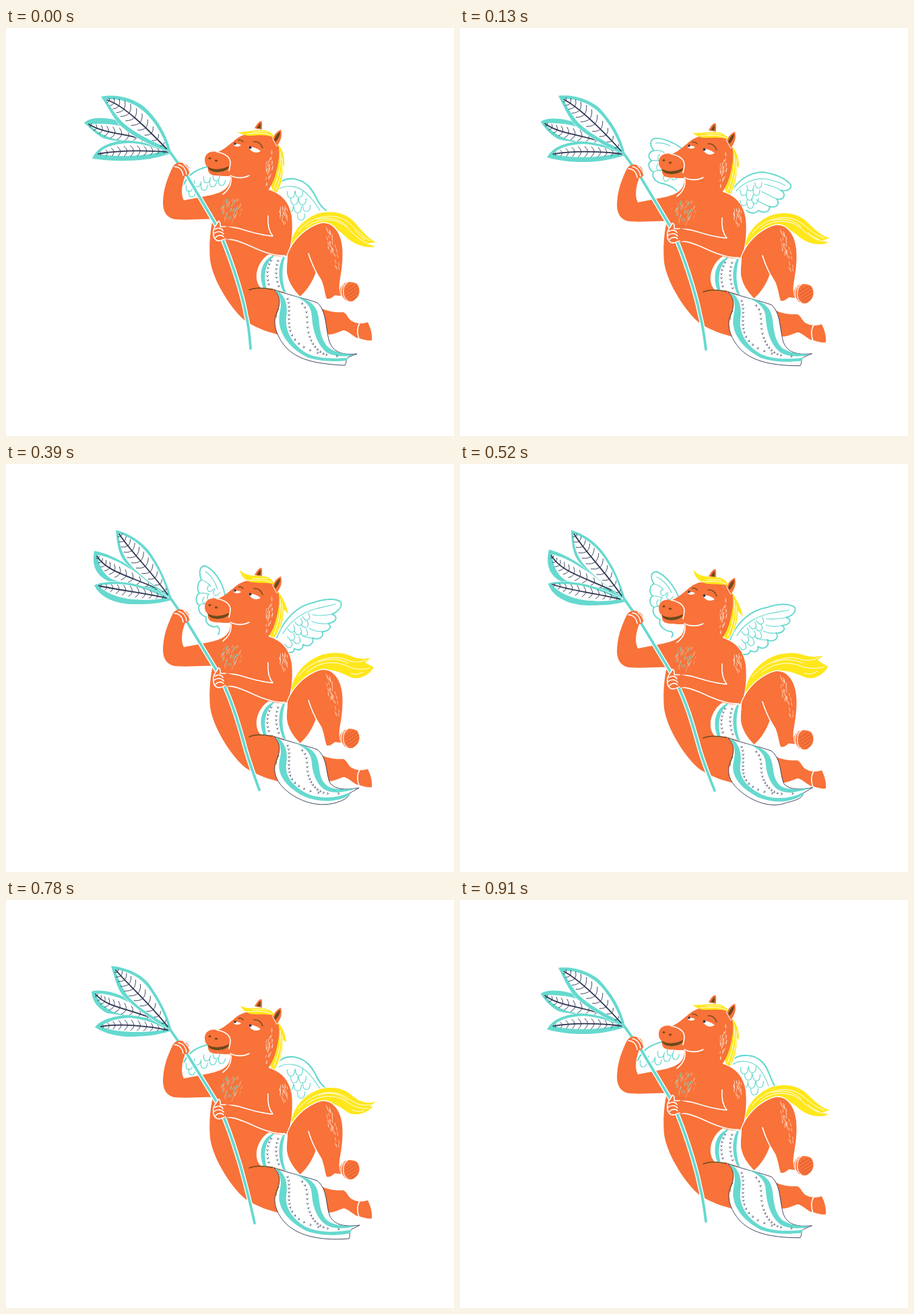
Animation of 665 by 606 pixels, one loop 1040 ms. Source, as an HTML page:

```html
<!DOCTYPE html>
<html lang="en">
<head>
<meta charset="utf-8">
<title>Winged horse</title>
<style>
html, body { margin: 0; width: 100%; height: 100%; overflow: hidden; background: #fff; }
svg { display: block; width: 665px; height: 606px; stroke-linecap: round; stroke-linejoin: round; }
</style>
</head>
<body>
<svg id="stage" viewBox="0 0 665 606"></svg>
<script>
const ORANGE = '#f87239', TEAL = '#66d9cf', YELLOW = '#ffe71c', NAVY = '#2f3552', BROWN = '#6b4a1c', WHITE = '#fff';
const STEP = 130;
const DROP = [0, 3, 9, 16, 18, 16, 9, 3];
const WING = ['low', 'half', 'up', 'top', 'up', 'half', 'low', 'tuck'];

const fill = (d, c, edge = 0) =>
  `<path d="${d}" fill="${c}"${edge ? ` stroke="${WHITE}" stroke-width="${edge}" paint-order="stroke"` : ''}/>`;
const line = (d, c = WHITE, w = 1.6) => `<path d="${d}" fill="none" stroke="${c}" stroke-width="${w}"/>`;
const shift = (y, s) => `<g transform="translate(0 ${y})">${s}</g>`;
const nums = s => s.match(/-?[\d.]+/g).map(Number);

// Blend three poses of one path, set at drops of 0, 9 and 16 px.
function pose(keys, drop) {
  const i = drop < 9 ? 0 : 1, f = i ? (drop - 9) / 7 : drop / 9;
  const to = nums(keys[i + 1]);
  let n = 0;
  return keys[i].replace(/-?[\d.]+/g, v => (+v + (to[n++] - v) * f).toFixed(1));
}

// Visit n points on a chain of cubics.
function along(path, n, visit) {
  const p = nums(path), segs = (p.length - 2) / 6;
  let out = '';
  for (let k = 0; k < n; k++) {
    const u = (k + .5) / n, s = Math.min(segs - 1, Math.floor(u * segs));
    const t = u * segs - s, m = 1 - t, q = p.slice(s * 6, s * 6 + 8);
    const at = j => m * m * m * q[j] + 3 * m * m * t * q[j + 2] + 3 * m * t * t * q[j + 4] + t * t * t * q[j + 6];
    const vel = j => m * m * (q[j + 2] - q[j]) + 2 * m * t * (q[j + 4] - q[j + 2]) + t * t * (q[j + 6] - q[j + 4]);
    out += visit(at(0), at(1), Math.atan2(vel(1), vel(0)), u);
  }
  return out;
}

const ray = (x, y, a, r) => `${(x + Math.cos(a) * r).toFixed(1)} ${(y + Math.sin(a) * r).toFixed(1)}`;

const chevrons = (path, n) => line(along(path, n, (x, y, a) =>
  `M${ray(x, y, a + 2.3, 1.7)}L${ray(x, y, a, 1)}L${ray(x, y, a - 2.3, 1.7)}`), NAVY, .8);

// Short hairs scattered in an ellipse.
function fuzz(cx, cy, rx, ry, n, lean, c, seed, tilt = 0) {
  let d = '';
  const rnd = () => (seed = seed * 16807 % 2147483647) / 2147483647;
  for (let i = 0; i < n; i++) {
    const r = Math.sqrt(rnd()), a = rnd() * 6.283, len = 3 + rnd() * 2.5;
    const y = cy + r * Math.sin(a) * ry, x = cx + r * Math.cos(a) * rx + (y - cy) * tilt;
    d += `M${x.toFixed(1)} ${y.toFixed(1)}l${(lean * len).toFixed(1)} ${len.toFixed(1)}`;
  }
  return line(d, c, .8);
}

function scales(list, r, turn = 0) {
  const p = nums(list);
  let s = '';
  for (let i = 0; i < p.length; i += 2)
    s += `<path transform="translate(${p[i]} ${p[i + 1]}) rotate(${turn})" d="M${-r} ${-r * .7}Q${-r} ${r} 0 ${r}Q${r} ${r} ${r} ${-r * .7}" fill="none" stroke="${TEAL}" stroke-width="1.2"/>`;
  return s;
}

const teal = (d, w = 1.9) => line(d, TEAL, w);
const wings = {
  low: { base: 0, art:
    teal('M398 241C404 228 415 223 427 224C447 227 455 241 461 253C465 262 470 267 475 271', 2.2) +
    teal('M405 239C418 232 433 235 443 243C453 251 459 260 466 271', 1.1) +
    scales('423 247 435 246 428 257 440 257 421 268 433 269 446 267 438 280', 5.5) +
    teal('M264 232C271 216 284 210 299 206', 2.2) +
    scales('272 238 284 231 298 225 312 222 294 236 307 231 320 229 276 246', 5, 10) },
  tuck: { base: 3, art:
    teal('M398 244C405 234 415 230 427 231C446 232 454 246 459 258C462 267 465 272 468 278', 2.2) +
    teal('M405 244C416 237 430 239 440 246C449 254 453 264 458 276', 1.1) +
    scales('422 253 434 251 428 262 440 263 422 273 433 274 445 273 437 284', 5.5) +
    teal('M264 238C270 223 283 215 299 211', 2.2) +
    scales('272 243 284 236 298 229 312 226 294 240 307 235 320 232', 5, 10) },
  up: { base: 9, art:
    teal('M401 252C410 228 430 208 456 204C472 198 490 198 497 204C500 211 492 217 484 219C494 221 490 230 478 231C486 236 478 243 469 242C475 249 466 257 456 252C461 262 450 268 442 262C444 269 438 272 431 268C430 274 424 275 418 273') +
    teal('M411 246C422 227 442 217 460 213C472 211 482 209 488 208M455 221C466 222 475 221 484 219M454 230C462 233 470 233 478 231M450 239C457 242 463 243 469 242M440 249C446 252 450 253 456 252', 1.2) +
    scales('446 224 435 231 444 234 424 240 434 244 443 246 424 252 432 256 420 262', 5, -30) +
    teal('M325 190C318 172 305 156 292 151C283 151 282 160 288 169C281 172 280 182 286 187C280 191 281 200 288 204C284 210 289 219 297 222C294 230 302 239 314 240C317 243 316 246 314 248') +
    teal('M314 182C309 171 300 162 292 159M288 169C294 171 299 173 302 178M286 187C292 187 297 188 301 190M288 204C291 202 294 202 297 203', 1.2) +
    scales('302 182 311 188 302 194 296 198', 4.5, 35) },
  top: { base: 16, art:
    teal('M402 258C412 232 432 210 456 206C472 200 490 199 497 205C500 212 492 220 484 223C494 227 490 235 478 237C486 242 478 249 469 249C473 256 464 263 455 258C458 267 449 273 441 268C441 276 434 278 428 274C428 280 422 281 418 279') +
    teal('M411 252C422 232 442 220 460 215C472 212 482 210 489 208M455 224C466 226 475 225 484 223M454 234C462 237 470 238 478 237M450 244C457 248 463 249 469 249M440 255C446 258 450 259 455 258', 1.2) +
    scales('446 227 435 235 444 238 424 245 434 249 443 251 424 257 432 262 420 268', 5, -30) +
    teal('M325 194C321 174 308 156 295 151C287 152 286 162 290 172C284 176 283 186 287 192C281 196 281 206 287 210C284 217 289 225 297 227C295 236 303 244 314 241C318 245 317 250 315 253') +
    teal('M314 186C310 173 302 163 296 160M290 172C296 174 301 177 304 182M287 192C293 191 297 192 301 194M287 210C291 207 294 207 297 208', 1.2) +
    scales('303 185 312 191 303 198 296 203', 4.5, 35) },
  half: { base: 16, art:
    teal('M401 260C410 240 430 227 450 227C468 230 483 236 491 246C492 253 485 256 476 254C485 260 481 269 470 267C476 275 469 281 459 278C461 286 451 289 443 284C438 290 430 288 425 284') +
    teal('M410 255C421 242 438 236 452 237C466 239 476 243 483 247M452 245C462 247 470 250 476 254M448 256C456 260 463 264 470 267M440 268C447 273 453 276 459 278', 1.2) +
    scales('443 246 431 250 440 257 421 257 430 264 438 269 421 272 431 276', 5, 0) +
    teal('M328 191C315 182 300 176 288 177C281 181 282 188 288 195C279 197 278 206 285 210C277 213 280 223 287 227C284 235 291 243 301 244C311 247 319 251 322 255') +
    teal('M312 188C303 184 296 183 290 184M288 195C294 194 299 195 303 198M285 210C291 209 295 210 299 212M287 227C292 224 297 224 302 226', 1.2) +
    scales('298 206 296 220 306 224 318 234 306 236', 4.5, 35) }
};

const tail = [
  'M423 320C426 300 442 284 462 276C482 270 502 274 515 286C526 298 536 312 549 318L536 320L548 325C528 328 512 318 502 308C492 298 480 291 466 291C448 295 432 310 425 322Z',
  'M423 329C428 306 444 288 466 281C484 276 502 280 513 290C525 300 538 304 549 299L540 307L545 306C535 318 520 321 508 316C495 306 484 300 470 300C450 304 432 319 425 331Z',
  'M423 335C428 310 446 291 470 283C490 278 502 281 514 286C524 290 532 290 541 288L533 295L546 302C538 315 522 322 510 316C497 310 484 304 470 306C450 311 432 326 425 337Z'];
const strands = [
  'M434 302C450 281 484 272 506 287C518 296 526 308 540 316M445 296C464 281 490 281 508 298C518 309 528 316 538 321M462 284C482 280 494 284 506 294M518 300C523 307 528 311 533 314',
  'M434 310C452 288 482 278 505 293C517 302 528 307 542 304M447 303C466 287 492 289 508 301C518 308 528 311 538 309M464 290C484 284 494 288 506 297M514 312C520 314 526 315 531 313',
  'M434 315C452 293 484 281 506 291C516 295 526 295 535 291M447 309C468 291 492 293 508 301C518 305 530 306 540 303M464 294C484 287 496 290 508 296M512 311C518 313 524 313 530 309'];
const bangs = [
  'M343 155C358 154 372 150 386 152C393 155 397 158 398 163C388 157 372 160 358 160C352 158 348 157 343 155Z',
  'M348 148C358 154 372 150 385 152C393 155 397 158 398 163C388 159 375 162 362 160C355 157 350 153 348 148Z',
  'M347 141C355 152 372 149 385 151C393 153 397 158 398 163C388 159 375 162 362 159C353 155 348 149 347 141Z'];
const mane = [
  'M403 172C411 180 414 192 413 206L411 203C411 222 408 236 401 245C396 242 393 238 394 232C400 212 404 195 403 172Z',
  'M403 172C411 180 415 191 416 202L411 199C411 219 406 234 398 243C393 241 391 236 392 230C399 212 404 195 403 172Z',
  'M403 172C411 182 417 195 419 207L412 200C412 220 406 234 397 243C392 241 390 236 391 230C399 212 404 195 403 172Z'];

// Each leaf: outline, pale inside, midrib; vein length last.
const leaves = [
  { edge: [
      'M116 141C125 132 145 133 160 136C185 143 215 160 240 183C200 168 160 170 143 163C130 155 125 148 116 141Z',
      'M127 136C140 132 160 137 173 143C195 153 220 172 243 193C210 172 170 172 150 168C135 160 128 150 127 136Z',
      'M131 129C148 132 165 140 180 150C200 162 225 180 243 200C210 182 175 176 152 174C133 165 127 150 131 129Z'],
    pale: [
      'M123 143C145 141 170 143 190 152C205 160 218 167 228 173C200 169 170 168 155 163C140 158 130 150 123 143Z',
      'M133 139C150 138 170 145 185 153C205 163 220 172 228 178C200 173 170 172 157 165C143 158 136 148 133 139Z',
      'M136 135C152 138 168 145 183 155C200 165 215 177 225 184C200 180 170 177 157 171C143 163 137 148 136 135Z'],
    rib: ['M123 143C150 160 190 155 233 177', 'M133 140C150 160 180 160 231 181', 'M135 137C150 160 180 165 231 188'], vein: 10 },
  { edge: [
      'M128 194C135 178 150 170 175 167C200 167 225 175 245 186C225 193 205 197 180 197C160 198 145 196 128 194Z',
      'M132 189C140 178 160 172 180 171C205 172 225 180 246 194C225 201 205 203 180 203C160 202 145 197 132 189Z',
      'M131 180C145 174 165 174 185 177C205 181 228 190 246 202C225 208 205 209 180 208C155 205 138 195 131 180Z'],
    pale: [
      'M137 187C145 176 165 171 185 171C205 172 222 178 233 182C215 190 165 193 137 187Z',
      'M141 188C150 179 170 175 185 175C205 177 225 184 238 192C210 198 165 198 141 188Z',
      'M137 181C150 178 170 177 188 181C207 185 225 193 237 199C205 205 160 203 137 181Z'],
    rib: ['M137 187C170 181 210 182 240 184', 'M141 188C170 183 210 187 240 193', 'M138 181C165 187 210 192 238 199'], vein: 9 },
  { edge: [
      'M141 102C165 97 190 105 205 117C222 132 238 155 245 185C215 175 185 160 168 143C157 130 150 115 141 102Z',
      'M156 98C180 100 200 110 212 124C230 150 240 170 246 194C220 180 190 160 172 140C165 130 162 118 156 98Z',
      'M163 98C185 104 203 116 215 133C232 158 240 180 246 201C225 185 195 165 178 147C167 135 165 120 163 98Z'],
    pale: [
      'M148 106C175 104 195 114 208 127C223 142 233 160 239 178C215 168 190 155 174 141C161 128 154 115 148 106Z',
      'M162 103C185 106 201 117 211 130C226 150 236 172 240 186C215 172 190 155 179 140C169 125 165 112 162 103Z',
      'M167 103C187 109 203 122 214 138C229 160 236 178 240 193C215 178 192 160 181 145C170 130 168 115 167 103Z'],
    rib: ['M150 107C175 115 205 145 238 179', 'M163 104C180 125 208 148 240 188', 'M168 104C185 130 212 155 240 194'], vein: 14 }
];

const shaft = [
  'M244 185L269 220L312 293C328 325 350 390 356 425C361 445 362 462 363 476',
  'M244 193L269 229L314 302C330 335 346 385 356 425C361 445 366 465 369 480',
  'M244 199L269 235L314 309C332 342 344 380 356 425C362 445 369 465 376 484'];

const cloth = [
  'M398 389C412 402 404 418 400 428C396 445 405 462 416 475C432 491 455 499 503 501C506 497 504 492 508 489L521 484C500 486 486 482 480 466C474 445 476 420 462 408C445 402 425 398 398 389Z',
  'M398 398C412 411 404 427 400 437C396 452 404 468 414 479C430 496 460 507 509 503C512 498 508 494 513 489L525 483C500 486 488 482 481 470C474 452 478 430 462 417C445 411 425 407 398 398Z',
  'M398 405C412 418 404 434 400 444C396 458 402 471 411 480C428 498 460 512 490 503C500 500 510 495 510 489L524 481C502 485 488 483 481 474C474 458 478 437 462 424C445 418 425 414 398 405Z'];
const bandL = [
  'M399 389C411 402 408 415 406 425C402 450 418 474 447 489C465 495 485 496 506 494L507 490C480 492 460 490 446 483C425 470 414 450 416 430C419 410 414 398 404 391Z',
  'M399 398C411 411 408 424 406 434C402 455 416 476 445 491C465 499 490 499 511 495L512 490C485 495 462 493 446 486C425 474 414 457 416 439C419 419 414 407 404 400Z',
  'M399 405C411 418 408 431 406 441C402 460 414 479 443 494C465 503 490 503 510 492L510 488C488 498 462 497 446 489C425 478 414 463 416 446C419 426 414 414 404 407Z'];
const bandR = [
  'M424 397C446 404 454 415 454 430C456 455 464 472 476 482C487 488 500 488 512 487L519 485C498 485 486 480 478 474C467 462 466 448 464 430C462 415 455 404 428 398Z',
  'M424 406C446 413 454 424 454 439C456 460 464 476 476 483C487 489 500 488 513 486L521 484C498 485 486 482 478 477C467 467 466 455 464 439C462 424 455 413 428 407Z',
  'M424 413C446 420 454 431 454 446C456 464 464 480 476 485C487 490 500 487 510 485L520 482C498 484 486 483 478 479C467 471 466 460 464 446C462 431 455 420 428 414Z'];
const rowL = [
  'M417 400C424 415 417 435 422 450C428 470 450 485 500 488',
  'M417 409C424 424 417 442 422 457C428 475 450 489 503 489',
  'M417 416C424 431 417 449 422 463C428 479 450 493 503 489'];
const rowR = [
  'M437 407C452 418 444 440 450 456C454 470 462 480 474 485',
  'M437 416C452 427 444 447 450 461C454 474 462 483 474 487',
  'M437 423C452 434 444 453 450 466C454 477 462 486 474 489'];

const body =
  fill('M333 219C334 236 325 244 300 249L264 256C259 247 261 232 266 220L272 214C273 206 268 201 258 200C250 202 247 207 244 214C238 228 233 242 233 262C234 275 240 282 250 284C270 286 290 283 307 284C303 300 301 325 303 345C307 370 322 396 338 417C346 427 353 434 360 438C375 447 390 452 407 456L425 440L412 400L417 338C424 325 426 300 424 280C421 262 412 247 389 240L400 200Z', ORANGE, 2) +
  fill('M369 149C372 143 375 139 379 138C381 142 380 146 380 151Z', ORANGE) +
  fill('M372 149C374 145 376 142 378 141L378 149Z', BROWN) +
  fill('M295 195C296 186 303 182 314 184C322 182 330 174 337 169C342 164 350 158 362 157L385 157C395 159 401 165 404 174C407 185 405 198 402 210C399 225 394 234 389 241L340 240L333 220C322 220 309 220 303 217C300 214 299 210 300 207C296 204 295 200 295 195Z', ORANGE) +
  fill('M396 164C399 157 403 153 408 151C410 158 409 167 402 175Z', ORANGE, 1.6) +
  fill('M398 166C400 160 403 156 407 154C407 160 404 165 400 169Z', BROWN) +
  line('M313 184C323 186 332 190 333 199C333 204 332 208 331 212') +
  line('M333 219C342 224 354 223 361 219') +
  line('M334 222C335 233 330 241 322 247') +
  fill('M299 206C307 211 320 211 331 205C331 210 325 213 315 214C307 214 301 212 299 206Z', BROWN) +
  `<ellipse cx="302.500" cy="193.500" rx="1.900" ry="1.500" fill="${BROWN}"/><ellipse cx="312" cy="197" rx="2.200" ry="1.500" fill="${BROWN}"/>` +
  fill('M338 174C341 171 346 172 349 174C345 177 341 177 338 174Z', WHITE) +
  `<circle cx="340" cy="172" r="1.700" fill="${NAVY}"/>` +
  fill('M360 177C366 176 374 179 378 183C371 187 364 185 360 177Z', WHITE) +
  `<circle cx="362.500" cy="177.500" r="2" fill="${NAVY}"/>` +
  line('M345 167C347 165 350 167 352 169M368 169C374 168 379 172 381 178', BROWN, 1.4) +
  fuzz(391, 206, 5, 26, 30, -.2, '#ffd9c2', 11, -.08) +
  fuzz(335, 268, 19, 19, 30, -.35, '#ffb08a', 5) + fuzz(334, 267, 13, 16, 26, -.4, TEAL, 77) +
  fuzz(413, 275, 7, 17, 24, .15, '#ffe3d2', 23, .1) +
  line('M389 279C388 292 391 303 396 309C378 308 360 302 347 298C338 296 331 295 324 296') +
  line('M324 314C335 312 350 318 365 325C380 332 398 339 414 338');

const legs =
  fill('M418 337C426 315 446 296 468 290C486 288 497 305 499 325C501 345 497 365 495 378C494 388 495 394 498 398L488 397C484 400 482 403 476 402C473 395 473 385 468 374L460 362C456 375 447 390 436 399C425 388 415 372 417 355Z', ORANGE, 3) +
  line('M449 335C452 345 456 354 460 362L468 376') +
  fuzz(484, 326, 6, 32, 36, .25, '#ffd9c2', 41, .25) +
  fill('M496 387C500 377 511 375 521 380C527 388 526 400 514 406C504 407 494 400 496 387Z', ORANGE, 1) +
  line('M507 378C499 382 498 400 507 405M501 381C496 387 496 398 502 403', WHITE, 1.2) +
  line('M504 389L516 381M504 394L521 383M506 398L523 387M508 402L523 392M513 404L522 398', '#cf5a2c', .9) +
  fill('M464 414C475 421 490 423 500 422C507 424 507 433 515 436C520 439 528 440 537 437C541 445 544 455 543 464C535 465 527 461 520 460C512 455 506 449 501 449C494 451 485 456 478 455Z', ORANGE) +
  line('M525 438C521 445 521 454 524 462');

const wrap =
  fill('M386 339C373 350 366 372 378 386C390 390 396 386 404 390L438 400C426 388 414 372 417 350L418 338C408 341 396 338 390 336Z', WHITE) +
  fill('M396 338C380 345 374 365 382 386L387 388C382 368 384 350 398 339Z', TEAL) +
  fill('M411 340C403 355 404 375 411 391L416 394C409 378 409 358 414 340Z', TEAL) +
  chevrons('M395 343C387 355 386 370 391 384', 7) + chevrons('M405 343C399 357 400 372 406 387', 7) +
  line('M361 389C373 384 384 387 396 388', BROWN, 1.5);

const hands =
  fill('M246 212C247 203 254 199 260 200C268 202 273 208 272 216C270 220 266 221 262 219L250 222Z', ORANGE) +
  line('M250 206C257 206 262 211 263 219M256 203C263 204 267 210 268 217M264 202C269 206 272 210 273 215') +
  fill('M309 299C309 294 314 292 315 287C318 286 319 290 318 294C325 293 332 296 340 298L336 313C328 313 318 318 313 315C308 311 308 304 309 299Z', ORANGE) +
  line('M315 287C314 292 308 295 308 301C307 308 309 314 314 316C319 317 322 314 326 313M316 287C319 289 318 293 318 295L326 295M310 299C315 296 320 297 322 301M309 305C314 301 320 302 323 306M311 311C315 307 320 307 323 310');

function leaf(l, drop) {
  const rib = pose(l.rib, drop);
  const veins = along(rib, 11, (x, y, a, u) => {
    const r = l.vein * Math.sin(Math.PI * (.06 + u * .88));
    return [1, -1].map(s =>
      `M${x.toFixed(1)} ${y.toFixed(1)}Q${ray(x, y, a + s * 1.7, r * .5)} ${ray(x, y, a + s * 2.1, r)}`).join('');
  });
  return fill(pose(l.edge, drop), TEAL, 1.2) + fill(pose(l.pale, drop), WHITE) +
    line(veins, NAVY, .9) + line(rib, NAVY, 1.8);
}

function scene(k) {
  const drop = DROP[k], wing = wings[WING[k]], at = keys => pose(keys, drop);
  const back = at(mane), pole = at(shaft), drape = at(cloth);
  return shift(drop - wing.base, wing.art) +
    fill(at(tail), YELLOW, 2) + line(at(strands), WHITE, 1) +
    shift(drop, fill(back, YELLOW, 2) +
      line('M407 184C409 204 404 222 397 239M410 192C411 210 407 225 401 240', WHITE, 1) +
      body + fill(at(bangs), YELLOW) +
      line('M357 157C370 157 382 154 394 160M366 154C374 155 382 152 388 155', WHITE, .9) +
      legs + wrap) +
    fill(drape, WHITE) + line(drape.replace('Z', ''), NAVY, .9) +
    fill(at(bandL), TEAL) + fill(at(bandR), TEAL) +
    chevrons(at(rowL), 17) + chevrons(at(rowR), 14) +
    shift(drop, line('M405 417C402 421 401 425 401 430', BROWN, 1)) +
    line(pole, WHITE, 6.6) + leaves.map(l => leaf(l, drop)).join('') + line(pole, TEAL, 3.8) +
    shift(drop, hands);
}

const stage = document.getElementById('stage');
const scenes = DROP.map((_, k) => scene(k));
let shown = -1;
function draw(now) {
  const k = Math.floor(now / STEP) % scenes.length;
  if (k !== shown) stage.innerHTML = scenes[shown = k];
}
const start = performance.now();
function tick() {
  draw(performance.now() - start);
  requestAnimationFrame(tick);
}
tick();
</script>
</body>
</html>
```
